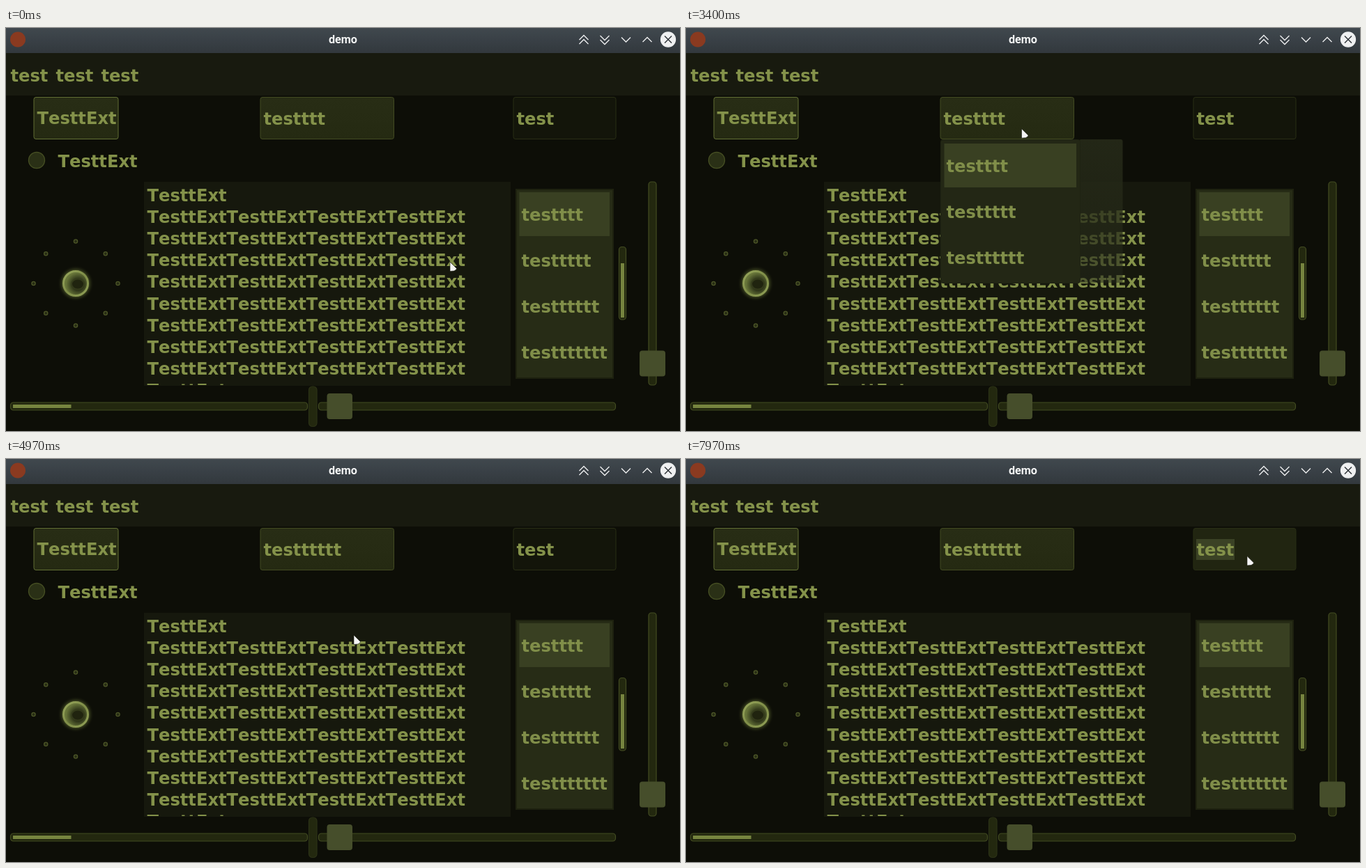
Animation of 967x579 px, one loop 8 s. Source, as an HTML page:

```html
<!DOCTYPE html>
<html lang="en">
<head>
<meta charset="utf-8">
<title>demo</title>
<style>
  html, body { margin: 0; width: 100%; height: 100%; overflow: hidden; background: #0d0e07; }
  svg { display: block; }
  text { font: bold 24.2px "DejaVu Sans", sans-serif; font-kerning: none; fill: #84924a; white-space: pre; }
  .title { font: bold 16.2px Roboto, sans-serif; fill: #f2f3f3; text-anchor: middle; }
  .list text { fill: #808e49; }
  .icons { fill: none; stroke: #eff0f1; stroke-width: 1.3; }
  .groove { fill: #23280f; stroke: #434c22; stroke-width: 1.2; }
  .fill { fill: #76843f; }
  .handle { fill: #464e2b; }
  .pick { fill: #394022; }
</style>
</head>
<body>
<svg width="967" height="579" viewBox="0 0 967 579">
  <defs>
    <linearGradient id="bar" x2="0" y2="1"><stop stop-color="#40484e"/><stop offset="1" stop-color="#32383d"/></linearGradient>
    <linearGradient id="face" x2="0" y2="1"><stop stop-color="#282d15"/><stop offset="1" stop-color="#252a12"/></linearGradient>
    <linearGradient id="shade" x2="0" y2="1"><stop stop-color="#252918" stop-opacity=".92"/><stop offset=".65" stop-color="#252918" stop-opacity=".72"/><stop offset="1" stop-color="#22261a" stop-opacity=".5"/></linearGradient>
    <linearGradient id="rim" x2="1" y2="1"><stop stop-color="#97a65c"/><stop offset=".5" stop-color="#808e48"/><stop offset="1" stop-color="#8f9e56"/></linearGradient>
    <radialGradient id="glow"><stop offset=".68" stop-color="#4b5527"/><stop offset="1" stop-color="#0d0e07" stop-opacity="0"/></radialGradient>
    <radialGradient id="bowl" cx=".6" cy=".55"><stop offset=".3" stop-color="#1c200f"/><stop offset="1" stop-color="#68763a"/></radialGradient>
    <clipPath id="page"><path d="M198 221h526v292H198z"/></clipPath>
  </defs>

  <!-- window frame -->
  <rect width="967" height="36" fill="url(#bar)"/>
  <circle cx="17" cy="16.500" r="11" fill="#8a3a20"/>
  <text class="title" x="483.500" y="22">demo</text>
  <g class="icons">
    <path d="M822.500 17l6.500-6.500 6.500 6.500m-13 6l6.500-6.500 6.500 6.500M852.500 11l6.500 6.500 6.500-6.500m-13 6l6.500 6.500 6.500-6.500M883 13.500l6.500 6.500 6.500-6.500M913.500 20l6.500-6.500 6.500 6.500"/>
    <circle cx="950" cy="16.500" r="10.500" fill="#eff0f1"/>
    <path d="M945 11.500l10 10m0-10l-10 10" stroke="#31363b" stroke-width="1.500"/>
  </g>
  <rect y="36" width="967" height="61" fill="#181a0f"/>
  <text x="6.500" y="77" word-spacing="2.600">test test test</text>

  <!-- top row -->
  <rect x="40" y="99.500" width="121" height="60" rx="3" fill="url(#face)" stroke="#626f35"/>
  <text x="44.500" y="138">TesttExt</text>
  <rect x="365" y="99.500" width="191.500" height="60" rx="3" fill="url(#face)" stroke="#434b22"/>
  <text id="choice" x="369.500" y="139"></text>
  <rect id="field" x="728" y="99.500" width="147" height="60" rx="3" stroke="#292e15"/>
  <rect id="marked" y="115" height="30" fill="#3b4225"/>
  <text x="732.500" y="139">test</text>
  <rect id="caret" y="115" width="6" height="30" fill="#464e2c"/>

  <circle cx="44" cy="190" r="11.500" fill="#2a3016" stroke="#454e23" stroke-width="1.400"/>
  <text x="74.500" y="199.500">TesttExt</text>

  <!-- dial -->
  <g id="dial">
    <circle cx="100" cy="367" r="26" fill="url(#glow)"/>
    <circle cx="100" cy="367" r="17.500" fill="url(#bowl)" stroke="url(#rim)" stroke-width="3"/>
    <ellipse cx="103" cy="368" rx="9" ry="7.500" fill="#20240f" stroke="#343b1b" stroke-width="2"/>
  </g>

  <!-- text page and list -->
  <rect x="198" y="221" width="526" height="293" fill="#16180d"/>
  <g id="lines" clip-path="url(#page)"></g>
  <rect x="732" y="232" width="139" height="271" fill="#272c16" stroke="#1d210f" stroke-width="2"/>
  <rect class="pick" x="736.500" y="236" width="129.500" height="63"/>
  <g id="items" class="list"></g>

  <!-- bars and sliders -->
  <g class="groove">
    <rect x="879.500" y="314.500" width="10" height="104.500" rx="4"/>
    <rect x="922" y="221" width="11" height="292" rx="4"/>
    <rect x="6.500" y="538" width="426" height="11" rx="4"/>
    <rect x="448.500" y="538" width="426" height="11" rx="4"/>
    <rect x="434.500" y="515" width="11.500" height="57.500" rx="5" stroke="#2c3217"/>
  </g>
  <rect class="fill" x="882" y="338" width="5" height="78"/>
  <rect class="fill" x="10" y="541" width="83.500" height="5"/>
  <rect class="handle" x="909" y="463.500" width="37" height="37" rx="4"/>
  <rect class="handle" x="460.500" y="525" width="36.500" height="37" rx="4"/>

  <!-- drop-down -->
  <g id="popup" class="list">
    <rect x="564" y="160" width="62.500" height="206" rx="3" fill="url(#shade)"/>
    <rect x="365.500" y="160.500" width="200" height="206" rx="3" fill="#232715" stroke="#1f2313"/>
    <rect id="hover" class="pick" x="370.500" width="189.500" height="63"/>
  </g>

  <path id="cursor" d="M0 0l9.500 9.500-.5 1.500-3 2-6 .5z" fill="#f4f4f4" stroke="#15170c" stroke-width=".6"/>
</svg>
<script>
const LOOP = 8000;
const $ = id => document.getElementById(id);
const set = (el, attrs) => { for (const k in attrs) el.setAttribute(k, attrs[k]); };
const add = (parent, tag, attrs, str = '') => {
  const el = document.createElementNS('http://www.w3.org/2000/svg', tag);
  set(el, attrs);
  el.textContent = str;
  parent.append(el);
};
const clamp = v => Math.min(1, Math.max(0, v));
const item = i => 'testttt' + 't'.repeat(i);

for (let i = 0; i < 10; i++)
  add($('lines'), 'text', { x: 202.5, y: 249 + 31.1 * i }, 'TesttExt'.repeat(i % 9 ? 4 : 1));
for (let i = 0; i < 4; i++) add($('items'), 'text', { x: 739.5, y: 277 + 66 * i }, item(i));
for (let i = 0; i < 3; i++) add($('popup'), 'text', { x: 373.5, y: 207 + 66 * i }, item(i));
for (let i = 0; i < 8; i++) {
  const a = i * Math.PI / 4;
  add($('dial'), 'circle', { cx: 100 + 60.5 * Math.cos(a), cy: 367 + 60.5 * Math.sin(a), r: 2.6,
    fill: '#272c14', stroke: '#4d5728', 'stroke-width': 1.3 });
}

// pointer keys: time, x, y
const path = [
  [0, 637, 336], [1340, 637, 336], [1730, 557, 242], [1970, 557, 242], [2470, 482, 133],
  [3367, 482, 133], [3400, 481.5, 144.5], [3900, 474, 324], [4030, 474, 325], [4640, 474, 325],
  [4970, 499, 253], [5070, 497, 246], [5600, 790, 136], [5800, 805, 139.5], [LOOP, 805, 139.5]
];
function pointer(t) {
  const i = path.findIndex(k => k[0] > t);
  const [a, b] = [path[i - 1], path[i]];
  const p = (t - a[0]) / (b[0] - a[0]);
  const e = (p + p * p * (3 - 2 * p)) / 2;
  return [1, 2].map(n => a[n] + (b[n] - a[n]) * e);
}

// caret keys: time, x (0 = hidden)
const caretKeys = [[0, 0], [6030, 787], [6330, 0], [6600, 787], [6770, 776], [7100, 760],
  [7370, 744], [7600, 732], [7970, 0]];

function draw(t) {
  const [x, y] = pointer(t);
  set($('cursor'), { transform: `translate(${x} ${y})` });

  $('choice').textContent = item(t < 4170 ? 0 : 2);
  set($('popup'), { opacity: t < 4170 ? clamp((t - 2770) / 270) : clamp((4400 - t) / 250) });
  const row = t < 3400 ? 0 : t > 4030 ? 2 : y < 231 ? 0 : y < 297 ? 1 : 2;
  set($('hover'), { y: 166 + 66 * row });

  set($('field'), { fill: t < 6030 ? '#13150a' : t < 6130 ? '#1a1d0e' : '#212511' });
  const caret = caretKeys.findLast(k => k[0] <= t)[1];
  set($('caret'), { x: caret, opacity: caret ? 1 : 0 });
  const from = t < 6770 ? 787 : caret || 732;
  set($('marked'), { x: from, width: 787 - from });
}

const start = performance.now();
function tick() {
  draw((performance.now() - start) % LOOP);
  requestAnimationFrame(tick);
}
tick();
</script>
</body>
</html>
```
